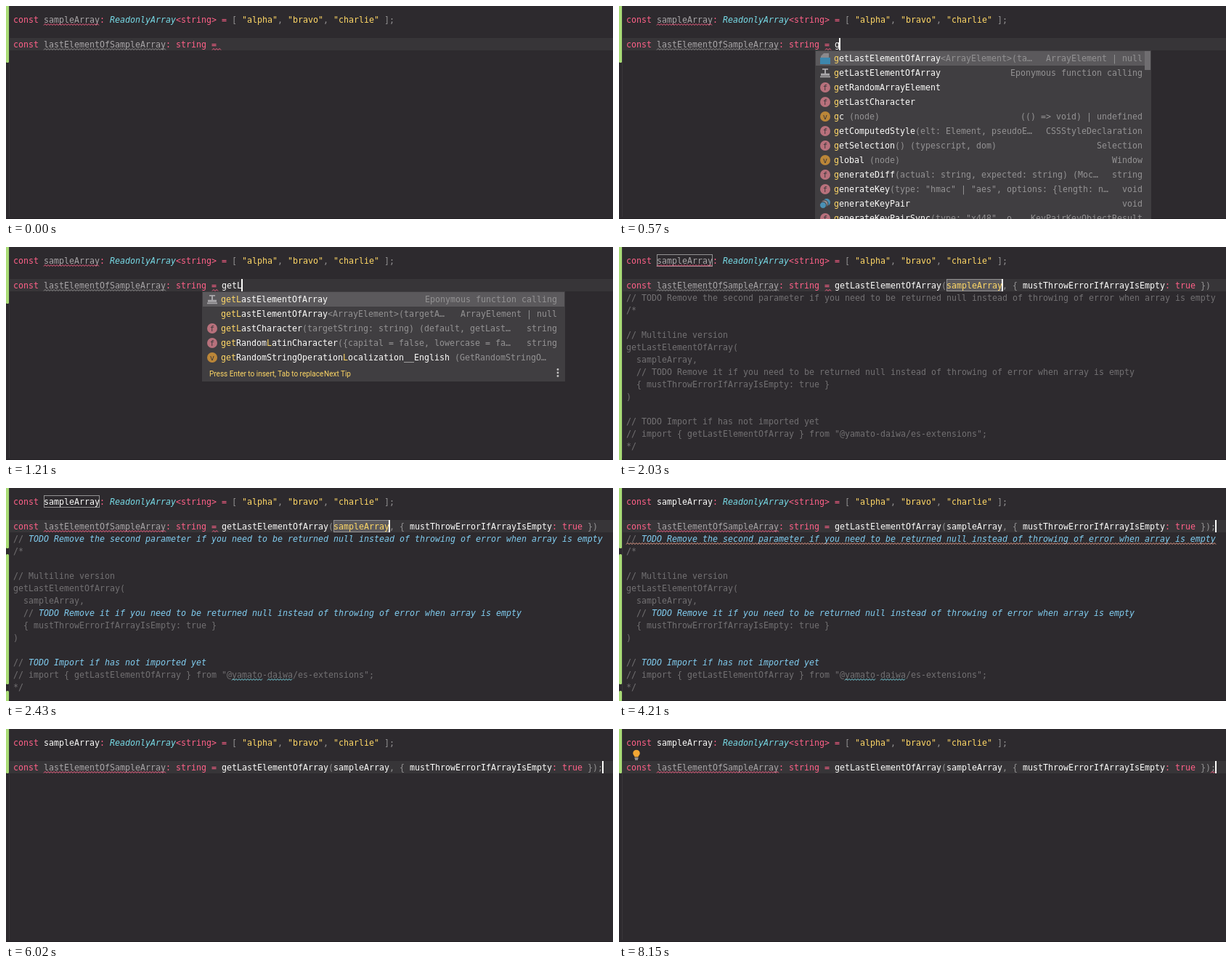
Write an HTML page that moves like this. It is 836 px wide and 293 px high and loops after 8.3 s.

```html
<!DOCTYPE html>
<html lang="en">
<head>
<meta charset="utf-8">
<title>Code completion</title>
<style>
  html, body { margin: 0; width: 100%; height: 100%; overflow: hidden; background: #2d2a2e; }
  svg { display: block; width: 836px; height: 293px; }
  text { white-space: pre; font: 11.63px "DejaVu Sans Mono", "Noto Sans Mono", monospace; }
  .p { fill: #ff6188; }
  .y { fill: #ffd866; }
  .c { fill: #78dce8; font-style: italic; }
  .w { fill: #fcfcfa; }
  .g { fill: #939293; }
  .d { fill: #a9a6a8; }
  .k { fill: #727072; }
  .t { fill: #81cdf0; font-style: italic; }
  .tip { fill: #ffd866; font: 10px Roboto, "Open Sans", sans-serif; }
  .glyph { fill: #3a373b; font-size: 10.5px; text-anchor: middle; }
  .wave { fill: none; stroke-width: 1; }
  .timed { animation: 8300ms step-end infinite; }
</style>
</head>
<body>
<svg id="stage" viewBox="0 0 836 293"></svg>
<script>
const LOOP = 8300, CHAR = 7, LEFT = 10, PITCH = 17;
const PINK = '#ff6188', GRAY = '#939293', SELECTED = '#5b595c', WHITE = '#fcfcfa';
const windows = new Map();

const escapeText = s => s.replace(/&/g, '&amp;').replace(/</g, '&lt;');
const rect = (x, y, w, h, fill, extra = '') =>
  `<rect x="${x}" y="${y}" width="${w}" height="${h}" fill="${fill}" ${extra}/>`;
const text = (x, y, cls, s) => `<text x="${x}" y="${y}" class="${cls}">${escapeText(s)}</text>`;
const colX = col => LEFT + col * CHAR;
const rowY = row => 10 + row * PITCH;

// Shows its parts from one time to another, with hard cuts.
function during(from, to, ...parts) {
  const name = `w${from}_${to}`;
  const at = ms => Math.max(0, (ms - 1) / LOOP * 100).toFixed(4) + '%';
  const hidden = '{visibility:hidden}';
  windows.set(name, `@keyframes ${name}{` + (from ? '0%' + hidden : '') +
    `${from ? at(from) : '0%'}{visibility:visible}` +
    (to < LOOP ? at(to) + hidden + '100%' + hidden : '100%{visibility:visible}') + '}');
  return `<g class="timed" style="animation-name:${name}">${parts.join('')}</g>`;
}

// Each part is a colour letter followed by its text.
function run(x, y, parts) {
  return parts.map(part => {
    const s = part.slice(1), out = s ? text(x, y, part[0], s) : '';
    x += s.length * CHAR;
    return out;
  }).join('');
}
const code = (row, col, ...parts) => run(colX(col), rowY(row) + 13, parts);

function wave(row, x, end, color) {
  let d = `M${x} ${rowY(row) + 16.5}`;
  for (let i = 1; x + 2 * i <= end; i++) d += `l2 ${i % 2 ? -2 : 2}`;
  return `<path class="wave" d="${d}" stroke="${color}"/>`;
}
const caret = (row, col) => rect(colX(col) - 1, rowY(row), 2, PITCH, WHITE);
const frame = (x, y, w, fill = 'none') =>
  rect(x + .5, y + .5, w - 1, 16, fill, `stroke="${GRAY}"`);
const bulb = row => {
  const y = rowY(row) + 2;
  return `<path d="M21.5 ${y + 9.5}c0-2-2.3-2.4-2.3-5a4.8 4.8 0 0 1 9.6 0c0 2.6-2.3 3-2.3 5z" fill="#f2a633"/>` +
    rect(21.5, y + 10.5, 5, 1.3, '#b9b7b9') + rect(22, y + 12.4, 4, 1.3, '#b9b7b9');
};
const bar = (y, end) => rect(0, y, 4, end - y, '#a9dc76', 'rx="1.5"');

// Completion popup
const disc = (fill, letter) => y => `<circle cx="284" cy="${y}" r="7" fill="${fill}"/>` +
  text(284, y + 3.5, 'glyph', letter);
const icons = {
  f: disc('#b8717c', 'f'),
  v: disc('#bb8638', 'v'),
  file: y => `<path d="M282 ${y - 7}h7v6h-11v-2z" fill="#8b898c"/>` + rect(277, y - 1, 14, 9, '#3d87ad'),
  stamp: y => `<path d="M280 ${y - 6}h8v1.7h-3v5h5v3h-12v-3h5v-5h-3zM277 ${y + 4.5}h14v1.7h-14z" fill="#a9a7aa"/>`,
  keys: y => `<circle cx="286" cy="${y - 2}" r="5" fill="#4a91b5"/>` +
    `<circle cx="283" cy="${y}" r="5" fill="#8f8d90" stroke="#403e41"/>` +
    `<circle cx="281" cy="${y + 2}" r="4.5" fill="#4a91b5" stroke="#403e41"/>`,
  none: () => ''
};

function highlight(name, typed) {
  let next = 0;
  return [...name].reduce((parts, ch) => {
    const key = next < typed.length && ch === typed[next] ? 'y' : 'w';
    if (key === 'y') next++;
    const last = parts.length - 1;
    if (last >= 0 && parts[last][0] === key) parts[last] += ch;
    else parts.push(key + ch);
    return parts;
  }, []);
}

function popup(edge, textEnd, typed, items, bottom) {
  const rows = items.map(([icon, name, tail = '', type = ''], i) => {
    const y = 72 + 20 * i, typeX = textEnd - type.length * CHAR;
    const room = Math.floor((typeX - 296 - (type ? 16 : 12)) / CHAR);
    const shown = name.length + tail.length > room ? tail.slice(0, room - name.length - 1) + '…' : tail;
    return icons[icon](y) + run(296, y + 4, [...highlight(name, typed), 'g' + shown]) +
      text(typeX, y + 4, 'g', type);
  });
  return rect(270, 61, edge - 270, bottom - 61, '#403e41') +
    rect(271, 62, edge - 272, 20, SELECTED) + rows.join('');
}
const scrollThumb = x => rect(x, 62, 8, 26, '#6f6d70');

const generic = ['file', 'getLastElementOfArray', '<ArrayElement>(targetArray: ReadonlyArray<ArrayElement>)', 'ArrayElement | null'];
const template = ['stamp', 'getLastElementOfArray', '', 'Eponymous function calling'];
const randomItem = ['f', 'getRandomArrayElement'];
const style = ['f', 'getComputedStyle', '(elt: Element, pseudoElt?: string | null)', 'CSSStyleDeclaration'];
const selection = ['f', 'getSelection', '() (typescript, dom)', 'Selection'];
const lastChar = ['f', 'getLastCharacter', '(targetString: string) (default, getLastCharacter)', 'string'];
const latin = ['f', 'getRandomLatinCharacter', '({capital = false, lowercase = false})', 'string'];
const english = ['v', 'getRandomStringOperationLocalization__English', ' (GetRandomStringOperation)'];

const listG = [
  generic, template, randomItem, ['f', 'getLastCharacter'],
  ['v', 'gc', ' (node)', '(() => void) | undefined'],
  style, selection,
  ['v', 'global', ' (node)', 'Window'],
  ['f', 'generateDiff', '(actual: string, expected: string) (MochaReporters)', 'string'],
  ['f', 'generateKey', '(type: "hmac" | "aes", options: {length: number}, callback)', 'void'],
  ['keys', 'generateKeyPair', '', 'void'],
  ['f', 'generateKeyPairSync', '(type: "x448", options)', 'KeyPairKeyObjectResult']
];
const listGet = [
  generic, template, randomItem, ['f', 'getLastCharacter'], style, selection, latin, english,
  ['f', 'getRandomInteger', '', 'number'], ['f', 'getRandomBoolean', '', 'boolean'],
  ['f', 'getRandomObjectProperty'], ['f', 'getIndexesOfSatisfyingElements', '', 'number[]']
];
const listGetL = [template, ['none', ...generic.slice(1)], lastChar, latin, english];

const tips = text(280, 177.5, 'tip', 'Press Enter to insert, Tab to replace') +
  text(438, 177.5, 'tip', 'Next Tip') +
  [168.5, 173, 177.5].map(y => `<circle cx="760" cy="${y}" r="1.4" fill="#c1c0c0"/>`).join('');

// Inserted comment block
const todos = [
  [3, 0, 'TODO Remove the second parameter if you need to be returned null instead of throwing of error when array is empty'],
  [9, 2, 'TODO Remove it if you need to be returned null instead of throwing of error when array is empty'],
  [13, 0, 'TODO Import if has not imported yet']
];
const comments = [
  [4, '/*'], [6, '// Multiline version'], [7, 'getLastElementOfArray('], [8, '  sampleArray,'],
  [10, '  { mustThrowErrorIfArrayIsEmpty: true }'], [11, ')'],
  [14, '// import { getLastElementOfArray } from "@yamato-daiwa/es-extensions";'], [15, '*/']
].map(([row, s]) => code(row, 0, 'k' + s)).join('') +
  todos.map(([row, col]) => code(row, col, 'k//')).join('');
const todoText = key => todos.map(([row, col, s]) => code(row, col + 3, key + s)).join('');

const caretRow = row => rect(5, rowY(row), 831, PITCH, '#373538');

const scene = [
  rect(0, 0, 836, 293, '#2d2a2e'),
  rect(4, 0, 1, 290, '#39363a'),
  during(0, 5050, caretRow(2)),
  during(5050, 6020, caretRow(16), rect(822, 44, 14, 17, SELECTED), rect(10, 61, 826, 221, SELECTED)),
  during(6020, LOOP, caretRow(2)),
  rect(0, 292, 836, 1, '#242125'),

  during(0, 2030, bar(-3, 78)),
  during(2030, 2360, bar(-3, 296)),
  during(2360, 6020, bar(-3, 83), bar(91, 270), bar(279, 296)),
  during(6020, LOOP, bar(-3, 61)),

  during(2030, 2750, frame(52, 10, 77), frame(451, 44, 77, SELECTED)),
  during(2750, 3530, rect(444, 44, 7, 17, SELECTED), rect(808, 44, 7, 17, SELECTED)),

  code(0, 0, 'pconst '),
  during(0, 2360, code(0, 6, 'dsampleArray'), wave(0, 52, 129, PINK)),
  during(2360, LOOP, code(0, 6, 'wsampleArray')),
  code(0, 17, 'p: ', 'cReadonlyArray', 'p<string> = ', 'g[ ', 'y"alpha"', 'g, ', 'y"bravo"', 'g, ', 'y"charlie"', 'g ];'),

  code(2, 0, 'pconst ', 'dlastElementOfSampleArray', 'p: string ='),
  during(0, 2360, wave(2, 52, 220, GRAY)),
  during(2360, LOOP, wave(2, 52, 220, PINK)),
  during(0, 460, wave(2, 284, 297, PINK)),
  during(460, 2750, wave(2, 284, 292, PINK)),

  during(460, 780, code(2, 41, 'wg'), caret(2, 42)),
  during(780, 1150, code(2, 41, 'wget'), caret(2, 44)),
  during(1150, 2030, code(2, 41, 'wgetL'), caret(2, 45)),

  during(2030, LOOP,
    code(2, 41, 'wgetLastElementOfArray', 'g('),
    code(2, 74, 'g, { ', 'wmustThrowErrorIfArrayIsEmpty', 'p: true', 'g })')),
  during(2030, 2750, code(2, 63, 'ysampleArray'), caret(2, 74)),
  during(2750, LOOP, code(2, 63, 'wsampleArray')),
  during(2750, 3530, caret(2, 115)),
  during(3530, LOOP, code(2, 115, 'g;')),
  during(3600, 4210, wave(2, 823, 828, PINK)),

  during(2030, 6020, comments),
  during(2030, 2360, todoText('k')),
  during(2360, 6020, todoText('t'), wave(14, 311, 353, '#78dce8'), wave(14, 360, 395, '#78dce8')),
  during(2850, 6020, wave(3, 10, 822, '#f0a58f')),

  during(3530, 5050, caret(2, 116)),
  during(5050, 5600, rect(10, 282, 2, 11, WHITE)),
  during(6020, 7630, caret(2, 116)),
  during(8150, LOOP, caret(2, 116)),
  during(6680, LOOP, wave(2, 815, 821, PINK)),

  during(110, 460, bulb(1)),
  during(4380, 5050, bulb(1)),
  during(5870, 6020, bulb(15)),
  during(6850, LOOP, bulb(1)),

  during(570, 630, popup(733, 721, 'g', listG, 293), scrollThumb(724)),
  during(630, 850, popup(770, 758, 'g', listG, 293), scrollThumb(761)),
  during(850, 1210, popup(770, 758, 'get', listGet, 293), scrollThumb(761)),
  during(1210, 2030, popup(770, 759, 'getL', listGetL, 185), tips)
];

const sheet = document.createElement('style');
sheet.textContent = [...windows.values()].join('\n');
document.head.append(sheet);
document.getElementById('stage').innerHTML = scene.join('');
</script>
</body>
</html>
```
